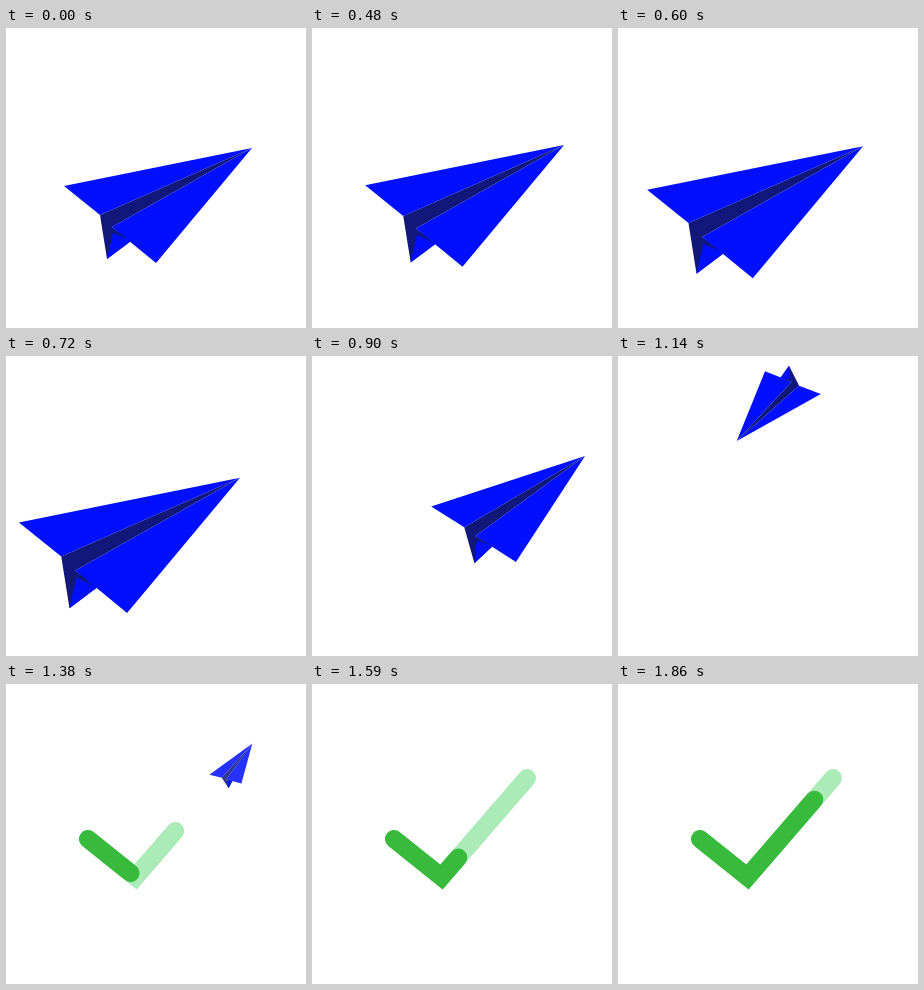
Write an HTML page with a canvas that moves like this. It is 300 by 300 pixels and loops after 2.28 s.

```html
<!DOCTYPE html>
<html lang="en">
<head>
<meta charset="utf-8">
<title>Paper plane to check mark</title>
<style>
html, body { margin: 0; width: 100%; height: 100%; overflow: hidden; background: #fff; }
canvas { display: block; width: 300px; height: 300px; }
</style>
</head>
<body>
<canvas id="stage" width="300" height="300"></canvas>
<script>
const ctx = document.getElementById('stage').getContext('2d');
const LOOP = 2280, STEP = 30, START = 480, END = 1860;
const BLUE = '#0010ff', NAVY = '#111879', GREEN = '#38ba3c', MINT = '#abebb7';

// Plane corners, relative to its centre
const nose = [96, -55], left = [-92, -17], fold = [-56, 12], keel = [-49, 56],
      inner = [-44, 24], notch = [-43, 30], belly = [-25, 38], right = [0, 60];

// time, x, y, scale, degrees, opacity
const flight = [
  [480, 150.5, 175.2, 1.058, 0, 1],
  [570, 141, 179, 1.13, 0, 1],
  [690, 118, 187.5, 1.185, 0, 1],
  [720, 121.1, 186.4, 1.176, 0, 1],
  [810, 152, 174, 1.04, -1.5, 1],
  [900, 198, 155.6, 0.844, -6.7, 1],
  [990, 247, 115, 0.68, -32, 1],
  [1040, 245, 72, 0.61, -80, 1],
  [1090, 207, 39, 0.552, -145, 1],
  [1140, 156.2, 44, 0.502, -197.8, 1],
  [1200, 107, 108, 0.44, -235, 1],
  [1260, 118, 165, 0.385, -292, 1],
  [1320, 170, 150, 0.33, -355, 1],
  [1380, 228.5, 84.4, 0.277, -384.5, 0.86],
  [1530, 258, 52, 0.2, -385, 0.15],
  [1560, 261, 49, 0.19, -385, 0]
];

// Stroke lengths over time
const lightKeys = [[1200, 0], [1380, 121.6], [1560, 191.6]];
const darkKeys = [[1230, 0], [1380, 54.5], [1530, 72], [1860, 163]];

const check = [[82, 155], [129.5, 193], [215, 94]];

// Smooth cubic through the keys
function sample(keys, t) {
  const last = keys.length - 1;
  if (t <= keys[0][0]) return keys[0].slice(1);
  if (t >= keys[last][0]) return keys[last].slice(1);
  const i = keys.findIndex(k => k[0] > t) - 1;
  const a = keys[i], b = keys[i + 1];
  const span = b[0] - a[0], u = (t - a[0]) / span;
  const slope = (j, c) => {
    const p = keys[Math.max(0, j - 1)], k = keys[j], n = keys[Math.min(last, j + 1)];
    const before = k[c] - p[c], after = n[c] - k[c];
    if (p !== k && n !== k && before * after <= 0) return 0;
    return (n[c] - p[c]) / (n[0] - p[0]);
  };
  return a.slice(1).map((_, m) => {
    const c = m + 1, u2 = u * u, u3 = u2 * u;
    return (2 * u3 - 3 * u2 + 1) * a[c] + (u3 - 2 * u2 + u) * span * slope(i, c)
         + (3 * u2 - 2 * u3) * b[c] + (u3 - u2) * span * slope(i + 1, c);
  });
}

function drawPlane([x, y, scale, deg, alpha]) {
  if (alpha <= 0) return;
  const cos = Math.cos(deg * Math.PI / 180) * scale;
  const sin = Math.sin(deg * Math.PI / 180) * scale;
  const fill = (color, ...points) => {
    ctx.fillStyle = color;
    ctx.beginPath();
    for (const [px, py] of points) ctx.lineTo(x + px * cos - py * sin, y + px * sin + py * cos);
    ctx.fill();
  };
  ctx.globalAlpha = Math.min(1, alpha);
  fill(NAVY, nose, fold, keel, belly, inner);
  fill(BLUE, keel, notch, belly);
  fill(BLUE, nose, left, fold);
  fill(BLUE, nose, inner, right);
  ctx.globalAlpha = 1;
}

function drawCheck(color, length) {
  if (length <= 0) return;
  ctx.strokeStyle = color;
  ctx.lineWidth = 18;
  ctx.lineCap = 'round';
  ctx.lineJoin = 'miter';
  ctx.beginPath();
  ctx.moveTo(...check[0]);
  for (let i = 1; i < check.length && length > 0; i++) {
    const [ax, ay] = check[i - 1], [bx, by] = check[i];
    const size = Math.hypot(bx - ax, by - ay);
    const part = Math.min(1, length / size);
    ctx.lineTo(ax + (bx - ax) * part, ay + (by - ay) * part);
    length -= size;
  }
  ctx.stroke();
}

function draw(now) {
  const t = Math.min(END, Math.floor((now % LOOP) / STEP) * STEP);
  ctx.fillStyle = '#fff';
  ctx.fillRect(0, 0, 300, 300);
  drawCheck(MINT, sample(lightKeys, t)[0]);
  drawCheck(GREEN, sample(darkKeys, t)[0]);
  drawPlane(t < START ? [150, 175, 1, 0, 1] : sample(flight, t));
}

const origin = performance.now();
function tick() {
  draw(performance.now() - origin);
  requestAnimationFrame(tick);
}
tick();
</script>
</body>
</html>
```
